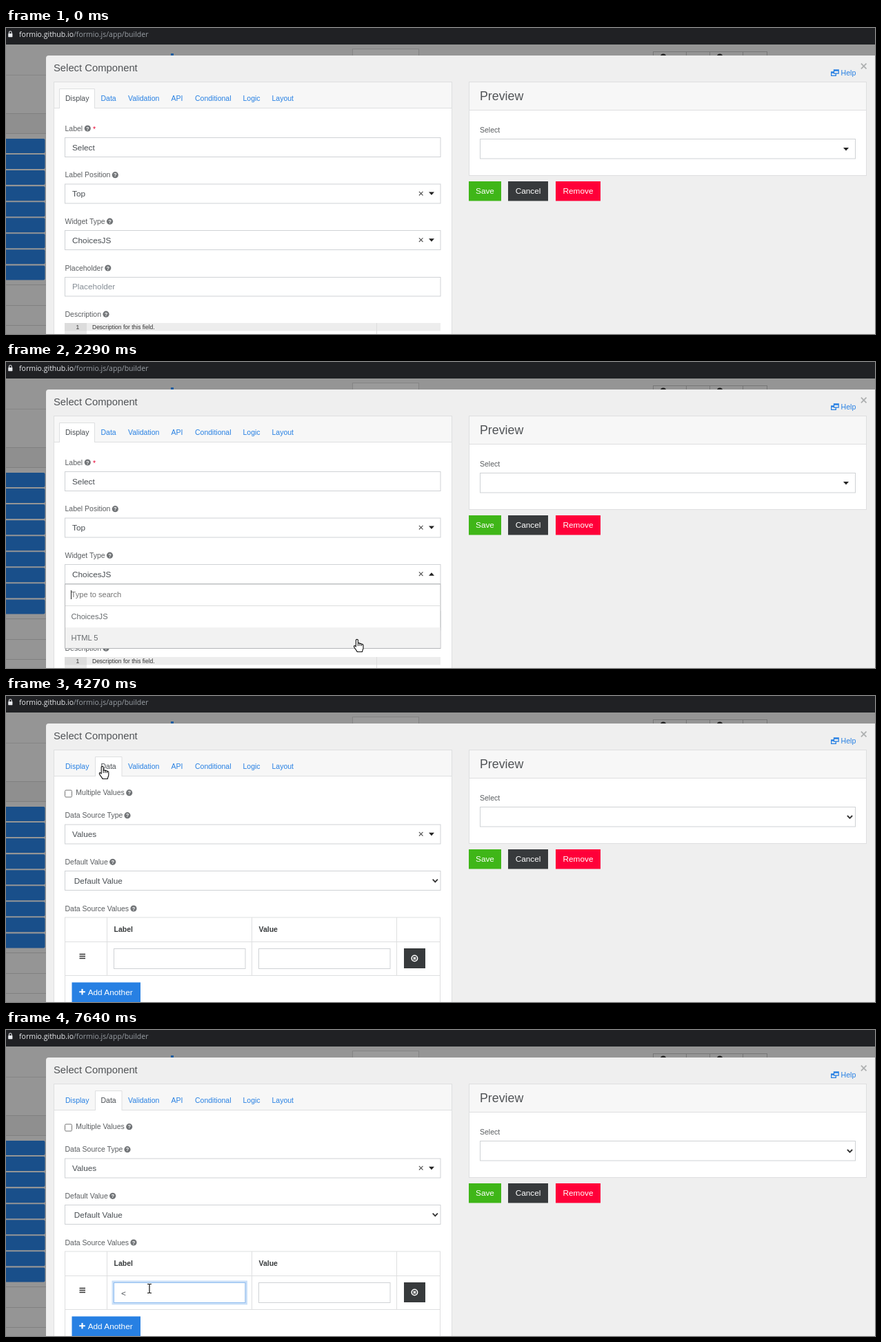
An HTML page that plays this animation: 1260 by 445 pixels, repeating every 8000 ms.

```html
<!DOCTYPE html>
<html lang="en">
<head>
<meta charset="utf-8">
<title>Select Component</title>
<style>
html, body { margin: 0; width: 100%; height: 100%; overflow: hidden; background: #efefef; }
svg { display: block; width: 1260px; height: 445px; font-family: "Liberation Sans", Arial, sans-serif; }
text { white-space: pre; }
</style>
</head>
<body>
<svg id="stage" viewBox="0 0 1260 445"></svg>
<script>
const LOOP = 8000;
const LINK = '#2780e3', INK = '#484d52', LABEL = '#5a5d60', LINE = '#cfd2d5', EDGE = '#dedfe0';

// ---- drawing helpers (text is placed by its vertical centre) ----
const text = (x, cy, str, size = 10.5, fill = LABEL, attr = '') =>
  `<text x="${x}" y="${cy + size * 0.36}" font-size="${size}" fill="${fill}" ${attr}>${str.replace(/</g, '&lt;')}</text>`;
const rect = (x1, y1, x2, y2, fill, attr = '') =>
  `<rect x="${x1}" y="${y1}" width="${x2 - x1}" height="${y2 - y1}" fill="${fill}" ${attr}/>`;
const box = (x1, y1, x2, y2, fill = '#fff', stroke = LINE) =>
  rect(x1 + 0.5, y1 + 0.5, x2 - 0.5, y2 - 0.5, fill, `stroke="${stroke}"`);
const path = (d, stroke, width = 1, attr = '') =>
  `<path d="${d}" fill="none" stroke="${stroke}" stroke-width="${width}" ${attr}/>`;
const group = (id, inner, attr = '') => `<g id="${id}" ${attr}>${inner}</g>`;
const cross = (x, y, r, color, width) =>
  path(`M${x - r} ${y - r}l${2 * r} ${2 * r}m0 ${-2 * r}l${-2 * r} ${2 * r}`, color, width);
const arrowDown = (x, y) => `<path d="M${x - 4} ${y - 2}h8l-4 4.5z" fill="#222"/>`;
const arrowUp = (x, y) => `<path d="M${x - 4} ${y + 2}h8l-4 -4.5z" fill="#222"/>`;
const chevron = (x, y) => path(`M${x - 3.6} ${y - 2}l3.6 3.7l3.6 -3.7`, '#333', 1.8);
const hint = (x, y) => `<circle cx="${x}" cy="${y}" r="4.6" fill="#727578"/>` +
  text(x, y, '?', 7.5, '#fff', 'font-weight="bold" text-anchor="middle"');
const label = (y, str, hintX, x = 85.5) => text(x, y, str) + hint(hintX, y);
const button = (x1, x2, str, fill) => rect(x1, 223, x2, 251.5, fill) +
  text((x1 + x2) / 2, 237, str, 11.8, '#fff', 'text-anchor="middle"');
const ring = (x1, y1, x2, y2) =>
  rect(x1 - 1, y1 - 1, x2 + 1, y2 + 1, 'none', 'stroke="#c9dff8" stroke-width="3"') +
  box(x1, y1, x2, y2, 'none', '#8fbdf0');
const caret = (id, x, y1, y2) => group(id, rect(x, y1, x + 1, y2, '#222'));

function backdrop() {
  let s = rect(0, 0, 1260, 445, '#959595') + rect(0, 0, 1260, 24, '#202124');
  s += '<rect x="3.2" y="8" width="6.2" height="5.2" rx=".6" fill="#e8eaed"/>' +
    path('M4.5 8.5V6.6a1.8 1.8 0 0 1 3.6 0V8.5', '#e8eaed', 1.1);
  s += `<text x="19" y="13" font-size="10.5" font-family="'Open Sans', 'Noto Sans', sans-serif" fill="#9aa0a6">` +
    '<tspan fill="#e8eaed">formio.github.io</tspan>/formio.js/app/builder</text>';
  s += rect(239, 37, 243, 41, '#1d5c9f') + box(502, 30, 599, 46, '#9a9a9a', '#848484');
  for (const x of [938, 1020]) {
    s += box(x, 34, x + 84, 46, '#959595', '#777') + rect(x + 48, 34, x + 49, 40, '#777');
    s += `<circle cx="${x + 15}" cy="42" r="4.5" fill="#222"/>`;
  }
  s += rect(0, 68, 60, 69, '#858585') + rect(0, 124, 60, 153, '#8f8f8f');
  for (const y of [124, 153, 373, 403, 432]) s += rect(0, y, 60, y + 1, '#808080');
  for (let i = 0; i < 9; i++)
    s += rect(-4, 161 + i * 23.05, 56.5, 182 + i * 23.05, '#194f8a', 'rx="2"');
  return s;
}

function modal() {
  let s = rect(58, 40, 1270, 460, '#efefef', 'rx="4"');
  s += text(69, 57.5, 'Select Component', 14.8, '#505356') + cross(1243.7, 55.5, 3.8, '#aeb0b1', 1.8);
  s += path('M1200.5 60.8h6.7v5.4h-6.7zM1200.5 62h6.7M1200 64h-3.3v5.4h6.6v-3M1196.7 65.2h4', LINK, 1.3);
  s += text(1210.5, 65.3, 'Help', 10.6, LINK);
  s += box(69, 78, 647, 460, '#fff', EDGE) + box(69, 78, 647, 117, '#f7f7f7', EDGE);
  s += box(671, 78, 1248, 215, '#fff', EDGE) + box(671, 78, 1248, 120, '#f7f7f7', EDGE);
  s += text(687, 98.5, 'Preview', 17.8, '#505356') + text(687, 148, 'Select');
  s += box(687, 161, 1232, 190.5);
  s += group('preview1', arrowDown(1218, 176)) + group('preview2', chevron(1223.5, 176));
  s += button(671, 718, 'Save', '#3fb618') + button(728, 786, 'Cancel', '#373a3c') + button(797, 862, 'Remove', '#ff0039');
  return s;
}

function tabs() {
  const tab = (id, x1, x2) => group(id, rect(x1 + 0.5, 88.5, x2 - 0.5, 118, '#fff') +
    path(`M${x1 + 0.5} 117V88.5H${x2 - 0.5}V117`, EDGE));
  let s = tab('tabA', 77, 129) + tab('tabB', 129, 168.5);
  s += group('hover', path('M129.5 117V88.5H168V117', '#eceeef'));
  s += `<g id="names">`;
  for (const [x, str] of [[86, 'Display'], [137.5, 'Data'], [177, 'Validation'], [239.5, 'API'],
    [274, 'Conditional'], [343.5, 'Logic'], [385.5, 'Layout']]) s += text(x, 102.3, str, 10.5, LINK);
  return s + '</g>';
}

function choice(y, id, str) {
  return box(85, y, 630.5, y + 29) + `<g id="${id}">${text(96, y + 14.3, str, 11.8, INK)}</g>` +
    cross(601.7, y + 14.2, 2.8, '#555', 1.1);
}

function displayPane() {
  let s = label(146, 'Label', 118.3) + text(126, 147, '*', 10.5, '#e8002f');
  s += box(85, 159, 630.5, 188) + text(96, 173.8, 'Select', 11.8, INK);
  s += label(213.7, 'Label Position', 158.3) + choice(226.5, 'place', 'Top') + arrowDown(617, 240.5);
  s += label(281.2, 'Widget Type', 150.5) + choice(294, 'widget', 'ChoicesJS');
  s += group('arrowD', arrowDown(617, 308.3)) + group('arrowU', arrowUp(617, 308.7));
  s += group('ringA', ring(85, 294, 630.5, 323));
  s += label(349, 'Placeholder', 147.8) + box(85, 362, 630.5, 390.5) + text(96, 376.2, 'Placeholder', 11.8, '#868e96');
  s += label(416.2, 'Description', 145);
  s += rect(85, 429, 630, 440.5, '#ededed') + rect(85, 429, 117, 445, '#e8e8e8') + rect(85, 429, 117, 440.5, '#dcdcdc');
  s += rect(537, 429, 538, 445, '#dedede') + text(101.5, 435.2, '1', 8.5, '#333') +
    text(125, 435.2, 'Description for this field.', 8.5, '#333');
  const edge = '#b4b6b8';
  s += group('drop',
    group('dropShort', box(85, 322.5, 630.5, 387, '#fff', edge)) +
    group('dropFull', box(85, 322.5, 630.5, 417, '#fff', edge)) +
    group('row1', rect(86, 355, 629.5, 386, '#f0f2f1')) + group('row2', rect(86, 386, 629.5, 416, '#f2f2f2')) +
    rect(86, 354, 630, 355, '#dcdddd') + text(94.5, 338.5, 'Type to search', 11.1, '#757575') +
    text(94.5, 370, 'ChoicesJS', 11.1, '#666a6d') + group('opt2', text(94.5, 401, 'HTML 5', 11.1, '#666a6d')) +
    caret('caretA', 94, 332, 345));
  return s;
}

function dataPane() {
  let s = rect(85.5, 137, 95.5, 147, '#fff', 'stroke="#767676" rx="1.5"');
  s += label(140.7, 'Multiple Values', 178.7, 101.3);
  s += label(173.7, 'Data Source Type', 176) + choice(186.5, 'source', 'Values') + arrowDown(617, 200.7);
  s += label(241.3, 'Default Value', 154.7) + box(85, 254, 630.5, 283) + chevron(622.3, 268.7);
  s += group('def', text(98.8, 268.7, 'Default Value', 11.8, INK));
  s += label(309, 'Data Source Values', 185);
  s += box(85, 321.5, 630, 460, '#fff', EDGE) + rect(85, 357, 630, 358, EDGE) + rect(85, 406, 630, 407, EDGE);
  for (const x of [146, 356, 566]) s += rect(x, 322, x + 1, 406, EDGE);
  s += text(156.5, 339.7, 'Label', 10.5, '#373a3c', 'font-weight="bold"') +
    text(366.5, 339.7, 'Value', 10.5, '#373a3c', 'font-weight="bold"');
  s += path('M106.5 375.5h8.5m-8.5 3h8.5m-8.5 3h8.5', '#333', 1.3);
  s += box(156, 367, 347.5, 397) + box(366, 367, 557.5, 397) + group('ringB', ring(156, 367, 347.5, 397));
  s += group('typed', text(167, 382.3, '<', 11.8, INK)) + caret('caretB', 167, 375, 389) + caret('caretC', 174, 375, 389);
  s += rect(577, 367, 608, 396, '#373a3c') + cross(592.4, 381.5, 1.6, '#fff', 1.5) +
    '<circle cx="592.4" cy="381.5" r="4.2" fill="none" stroke="#fff" stroke-width="1.6"/>';
  s += rect(95.5, 416.5, 195, 445, LINK) + path('M110.5 426v8.6m-4.3 -4.3h8.6', '#fff', 2.1) +
    text(118.7, 430.7, 'Add Another', 11.8, '#fff');
  return s;
}

function pointers() {
  const shape = (id, d, extra = '') => group(id,
    `<path d="${d}" fill="#fff" stroke="#111" stroke-width="1.1" stroke-linejoin="round"/>${extra}`);
  return group('click', '<circle r="9.8" fill="#fff01e" fill-opacity=".88"/>') +
    group('pointer',
      shape('arrow', 'M.5 .5V14.5L3.7 11.5L6 16.6L8.2 15.6L6 10.7H10.3Z') +
      shape('hand', 'M-1.6 11V1.6C-1.6 0 1.4 0 1.4 1.6V6.3C1.7 5.3 4 5.4 4.1 6.9C4.5 6.1 6.6 6.3 6.7 7.7' +
        'C7.2 7.1 9 7.4 9 9V13C9 15 7.5 16 7.5 18.5H.2C-.5 16 -4 13.2 -4.4 11.2C-4.8 9.3 -3 8.9 -1.6 11Z',
        path('M1.4 6.3V10M4.1 6.9V10M6.7 7.7V10', '#111')) +
      group('beam', path('M-3 -6.5H-1L0 -5.7L1 -6.5H3M0 -5.7V5.7M-3 6.5H-1L0 5.7L1 6.5H3', '#111', 1.2)));
}

const stage = document.getElementById('stage');
stage.innerHTML = backdrop() + modal() + tabs() + group('display', displayPane()) +
  group('data', dataPane()) + pointers();
const el = id => document.getElementById(id);
const show = (id, on) => el(id).setAttribute('visibility', on ? 'inherit' : 'hidden');
const names = el('names').children, widget = el('widget').firstChild;

// ---- pointer motion: start, end, target, from the place before ----
const START = [986, 424];
const MOVES = [
  [220, 1020, 517.6, 304.5],
  [1340, 1740, 509, 403],
  [2520, 2600, 508, 402],
  [2840, 3400, 127.5, 125],
  [3400, 3560, 136.8, 104.5],
  [3560, 3720, 139.8, 102],
  [4270, 4900, 207.5, 375.5],
  [4900, 4980, 208, 376]
];
function pointerAt(t) {
  let [x, y] = START;
  for (const [t0, t1, tx, ty] of MOVES) {
    if (t < t0) break;
    const n = Math.round((t1 - t0) / 80);
    const u = Math.min(1, Math.floor((t - t0) * n / (t1 - t0) + 1e-6) / n);
    const e = u * u * (3 - 2 * u);
    x += (tx - x) * e;
    y += (ty - y) * e;
  }
  return [x, y];
}
function pointerKind(x, y, open, data) {
  const inside = (x1, y1, x2, y2) => x >= x1 && x <= x2 && y >= y1 && y <= y2;
  if (inside(78, 88, 425, 117)) return 'hand';
  if (data) return inside(156, 367, 348, 397) ? 'beam' : inside(85, 186, 630, 216) ? 'hand' : 'arrow';
  if (inside(85, 294, 630, 323) || inside(85, 226, 630, 255)) return 'hand';
  if (open && inside(85, 323, 630, 417)) return y < 355 ? 'beam' : 'hand';
  return inside(85, 159, 630, 188) || inside(85, 362, 630, 390) ? 'beam' : 'arrow';
}

function render(t) {
  const within = (a, b) => t >= a && t < b;
  const [x, y] = pointerAt(t);
  const open = within(1180, 2600), full = t >= 1340, data = t >= 4190, picked = t >= 2600;
  const kind = pointerKind(x, y, open, data);
  const onSecond = open && full && y > 386;

  show('display', !data);
  show('data', data);
  show('tabA', !data);
  show('tabB', data);
  const hover = !data && x >= 129 && x <= 168 && y >= 88 && y <= 117;
  show('hover', hover);
  names[0].setAttribute('fill', data ? LINK : INK);
  names[1].setAttribute('fill', data ? INK : hover ? '#165ba8' : LINK);

  if (!data) {
    widget.textContent = picked ? 'HTML 5' : 'ChoicesJS';
    show('arrowD', !open);
    show('arrowU', open);
    show('ringA', picked);
    show('drop', open);
    if (open) {
      show('dropShort', !full);
      show('dropFull', full);
      show('opt2', full);
      show('row1', !onSecond);
      show('row2', onSecond);
      show('caretA', !within(1740, 2290));
    }
  } else {
    show('def', !within(7330, 7490));
    show('ringB', t >= 5220);
    el('ringB').setAttribute('opacity', t < 5300 ? 0.5 : 1);
    show('caretB', within(5140, 5690) || within(6230, 6780));
    show('typed', t >= 7090);
    show('caretC', within(7090, 7640));
  }
  show('preview1', t < 2680);
  show('preview2', t >= 2680);

  show('click', within(1100, 1180) || within(2520, 2680) || within(4110, 4270) || within(5140, 5300));
  el('click').setAttribute('transform', `translate(${x - 1.5} ${y})`);
  show('pointer', t >= 220);
  el('pointer').setAttribute('transform', `translate(${x} ${y})`);
  for (const id of ['arrow', 'hand', 'beam']) show(id, id === kind);
}

const begin = performance.now();
function tick() {
  render((performance.now() - begin) % LOOP);
  requestAnimationFrame(tick);
}
tick();
</script>
</body>
</html>
```
